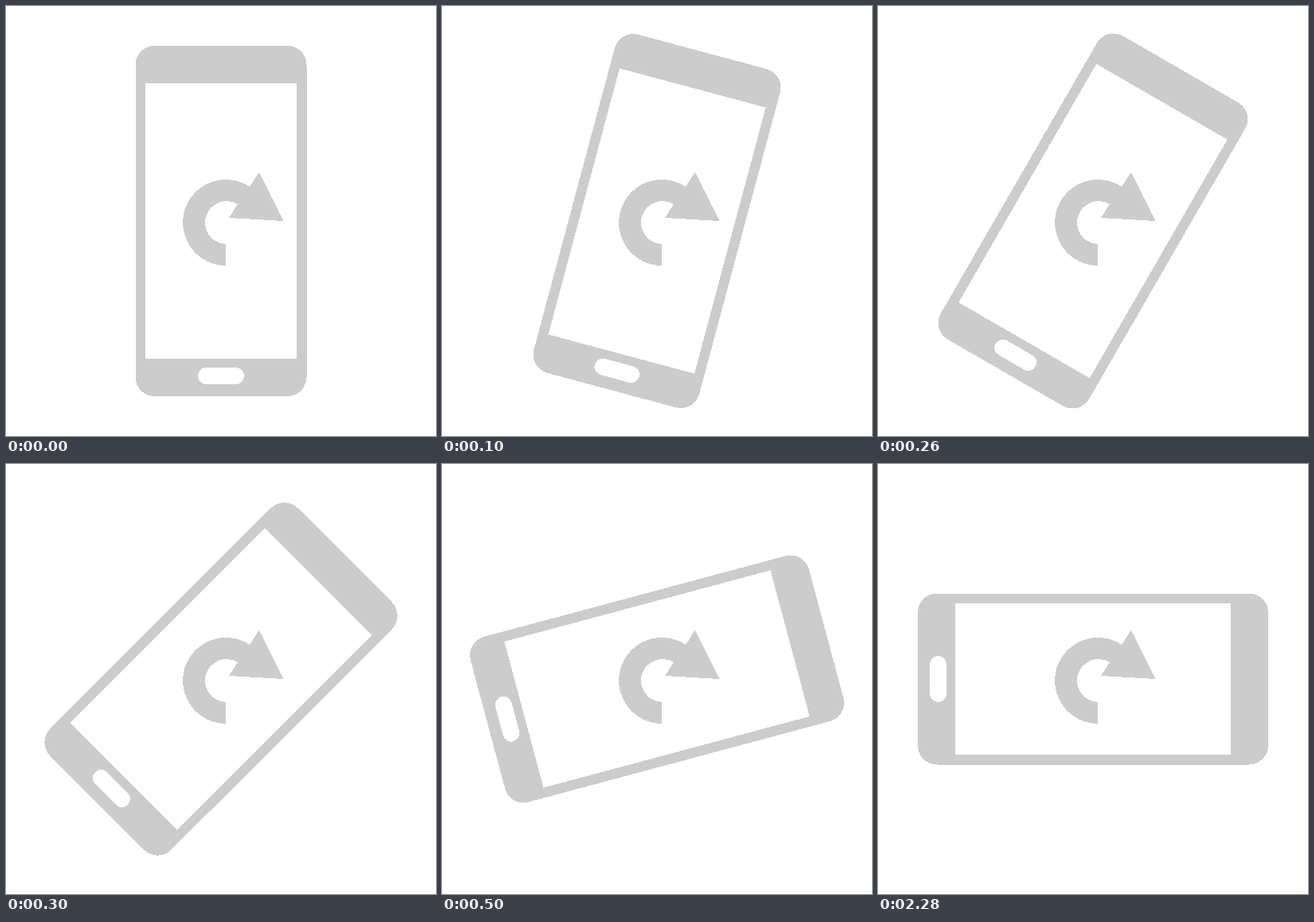
Animation, 540 px wide and 540 px high, one loop 3.4 s. Source, as an HTML page:

```html
<!DOCTYPE html>
<html lang="en">
<head>
<meta charset="utf-8">
<title>Rotate your phone</title>
<style>
  html, body { margin: 0; height: 100%; overflow: hidden; background: #fff; }
  svg { display: block; width: 100%; height: 100%; shape-rendering: crispEdges; }
</style>
</head>
<body>
<svg viewBox="0 0 540 540" fill="#ccc">
  <g id="phone">
    <rect x="162.5" y="50" width="215" height="440" rx="24"/>
    <rect x="175" y="97" width="190" height="346" fill="#fff"/>
    <rect x="241" y="454" width="58" height="21" rx="10.5" fill="#fff"/>
  </g>
  <path d="M276 326A54 54 0 1 1 306 227L318 208.5 348.5 270 280 266 291 249A27 27 0 1 0 276 299Z"/>
</svg>
<script>
  const LOOP = 3400, STEP = 100, STEP_ANGLE = 15, LAST_STEP = 6;
  const phone = document.getElementById('phone');
  const start = performance.now();

  function draw(now) {
    const time = Math.max(0, now - start) % LOOP;
    const step = Math.min(LAST_STEP, Math.floor(time / STEP));
    phone.setAttribute('transform', `rotate(${step * STEP_ANGLE} 270 270)`);
    requestAnimationFrame(draw);
  }
  draw(start);
</script>
</body>
</html>
```
